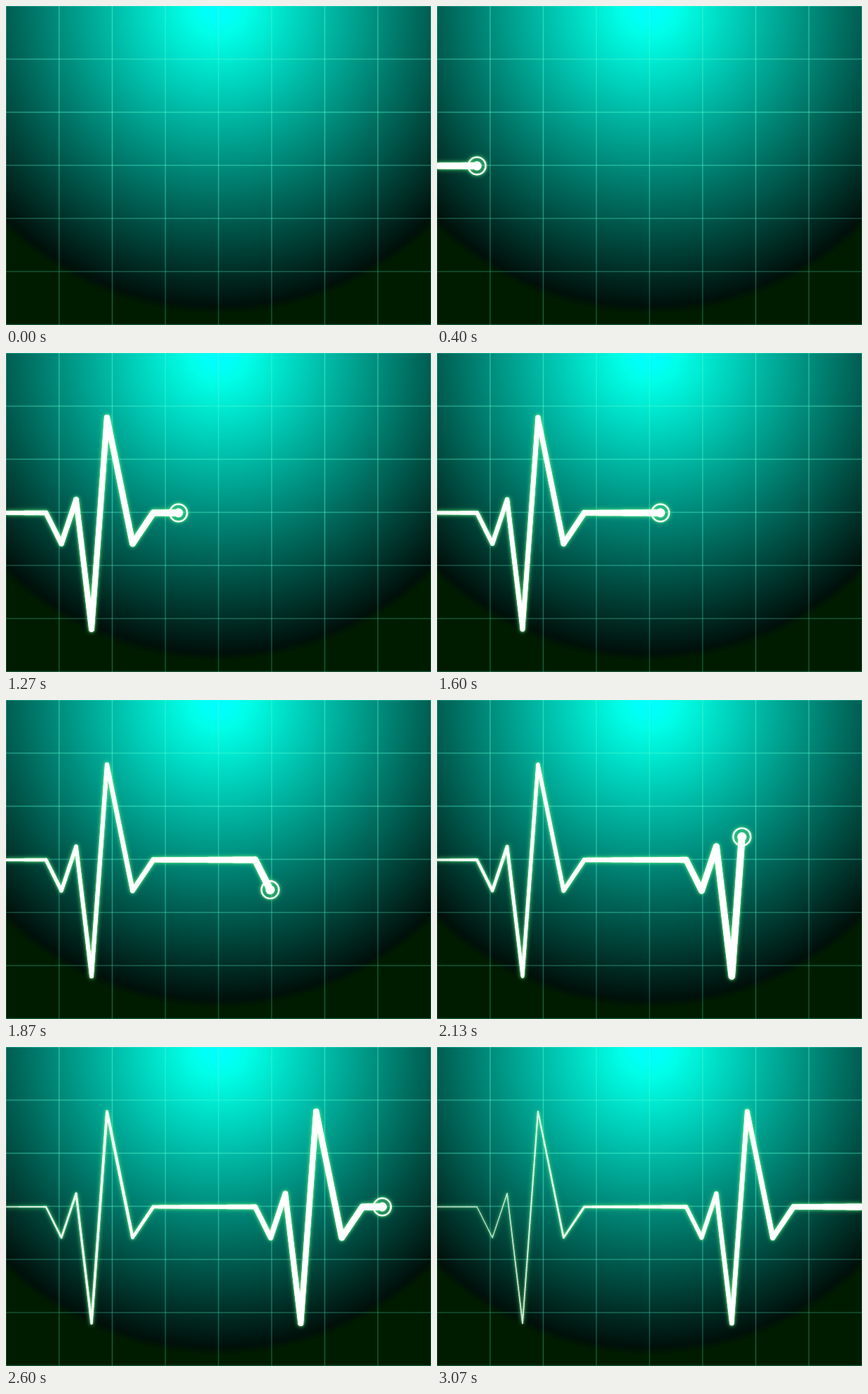
An HTML page with a canvas for the animation above (3.14 s loop, 606 px wide and 455 px high).

```html
<!DOCTYPE html>
<html lang="en">
<head>
<meta charset="utf-8">
<title>Heartbeat monitor</title>
<style>
  html, body { margin: 0; width: 100%; height: 100%; overflow: hidden; background: #001c00; }
  .stage { position: relative; width: 606px; height: 455px; overflow: hidden; }
  .glow, .grid, canvas { position: absolute; inset: 0; }
  .glow {
    background: radial-gradient(circle at 303px 0,
      #0ff 0, #00fff8 22px, #00fee8 42px, #00ebd3 76px, #00100a 428px, #001c00 440px);
  }
  .grid {
    --line: rgba(80, 255, 210, .46);
    --none: rgba(80, 255, 210, 0);
    --stops: var(--line) 0, var(--none) 1.4px, var(--none) 74.35px, var(--line) 75.75px;
    background:
      repeating-linear-gradient(90deg, var(--stops)),
      repeating-linear-gradient(180deg, var(--stops));
    mask-image: radial-gradient(circle at 303px 0, #000 260px, rgba(0, 0, 0, .6) 440px);
  }
  canvas { filter: drop-shadow(0 0 1.5px rgba(130, 255, 140, .85)) drop-shadow(0 0 3px rgba(90, 255, 140, .6)); }
</style>
</head>
<body>
<div class="stage">
  <div class="glow"></div>
  <div class="grid"></div>
  <canvas width="606" height="455"></canvas>
</div>
<script>
const W = 606, H = 455, LOOP = 3140, STEP = 1000 / 15, LAST = 46;
const SPEED = 14.53, BASE = 228, PERIOD = 298.3;
const beat = [[57, BASE], [79, 272], [100, 209], [122, 394], [144, 92], [180.5, 272], [210, BASE]];
const path = [[-40, BASE], ...beat, ...beat.map(([x, y]) => [x + PERIOD, y]), [660, BASE]];
const ctx = document.querySelector('canvas').getContext('2d');
ctx.lineCap = 'round';
ctx.strokeStyle = ctx.fillStyle = '#fff';

const ageAt = (x, head) => (head - x) / SPEED;
const widthAt = age => Math.max(1.3, 9.6 - 0.22 * age);

function line(x1, y1, x2, y2, width) {
  ctx.lineWidth = width;
  ctx.beginPath();
  ctx.moveTo(x1, y1);
  ctx.lineTo(x2, y2);
  ctx.stroke();
}

// The trace gets thinner with age, so it is drawn in short pieces.
function drawTrace(head) {
  for (let i = 1; i < path.length; i++) {
    const [ax, ay] = path[i - 1], [bx, by] = path[i];
    if (ax >= head) return ay;
    const part = Math.min(1, (head - ax) / (bx - ax));
    const dx = (bx - ax) * part, dy = (by - ay) * part;
    const n = Math.ceil(Math.hypot(dx, dy) / 4);
    for (let j = 0; j < n; j++) {
      const u = j / n, v = (j + 1) / n;
      line(ax + dx * u, ay + dy * u, ax + dx * v, ay + dy * v, widthAt(ageAt(ax + dx * u, head)));
    }
    if (part < 1) return ay + dy;
  }
  return BASE;
}

function fadeTail(head) {
  const fade = ctx.createLinearGradient(head - 46 * SPEED, 0, head - 26 * SPEED, 0);
  fade.addColorStop(0, 'rgba(255,255,255,.55)');
  fade.addColorStop(1, '#fff');
  ctx.save();
  ctx.globalCompositeOperation = 'destination-in';
  ctx.fillStyle = fade;
  ctx.fillRect(0, 0, W, H);
  ctx.restore();
}

function drawHead(x, y) {
  ctx.beginPath();
  ctx.arc(x, y, 6.5, 0, 7);
  ctx.fill();
  ctx.lineWidth = 2.4;
  ctx.beginPath();
  ctx.arc(x, y, 12.4, 0, 7);
  ctx.stroke();
}

function draw(now) {
  const step = Math.min(LAST, Math.floor((now % LOOP + 5) / STEP));
  const head = 57 + SPEED * (step - 6);
  ctx.clearRect(0, 0, W, H);
  const y = drawTrace(head);
  fadeTail(head);
  drawHead(head, y);
}

let start;
function tick(now) {
  start ??= now;
  draw(now - start);
  requestAnimationFrame(tick);
}
requestAnimationFrame(tick);
</script>
</body>
</html>
```
